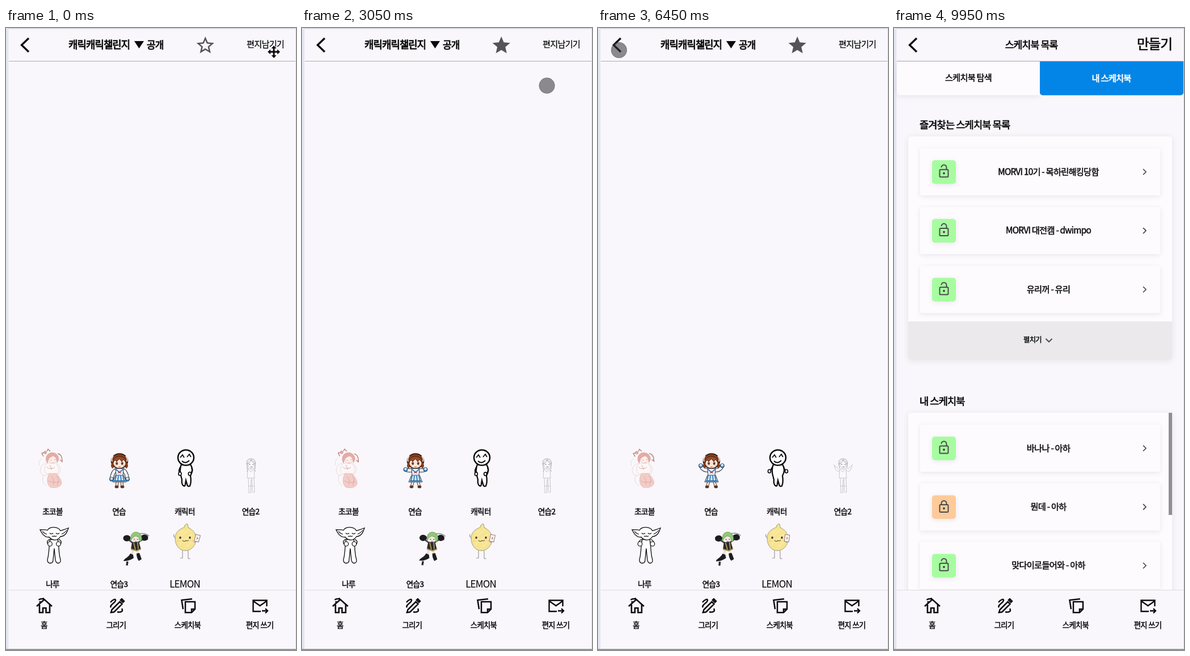
Write an HTML page with a canvas that moves like this. It is 511 by 1096 pixels and loops after 10 s.

```html
<!DOCTYPE html>
<html lang="ko">
<head>
<meta charset="utf-8">
<style>
html, body { margin: 0; width: 100%; height: 100%; overflow: hidden; background: #f9f7fb; }
canvas { display: block; width: 511px; height: 1096px; }
</style>
</head>
<body>
<canvas id="stage" width="511" height="1096"></canvas>
<script>
const ctx = document.getElementById('stage').getContext('2d');
const LOOP = 10000;
const BG = '#f9f7fb', CARD = '#fdfbfe', INK = '#0b0b0d', GREY = '#545456';
const FONT = '"Noto Sans CJK KR", "Noto Sans CJK JP", "Noto Sans CJK", "Noto Sans", sans-serif';

// Smooth value between keys [time, ...values].
function track(keys, t) {
  const i = keys.findIndex(k => k[0] > t);
  if (i < 0) return keys[keys.length - 1].slice(1);
  const a = keys[i - 1], b = keys[i];
  let p = (t - a[0]) / (b[0] - a[0]);
  p = p * p * (3 - 2 * p);
  return a.slice(1).map((v, n) => v + (b[n + 1] - v) * p);
}
const mix = (a, b, p) => a.map((v, i) => v + (b[i] - v) * p);

const POINTER = [
  [0, 472, 42], [200, 472, 42], [1150, 352, 34], [1500, 352, 36], [2050, 427, 64], [2600, 440, 110],
  [3200, 430, 100], [3850, 42, 33], [4000, 52, 37], [4120, 50, 38], [4850, 342, 605], [5350, 300, 572],
  [5700, 300, 572], [6300, 38, 38], [6450, 37, 39], [6900, 351, 26], [7150, 351, 26], [7750, 38, 33],
  [8050, 38, 33], [8450, 365, 305], [9200, 345, 420], [9700, 345, 430]
];
const RAISE = [[0, 0], [700, 1], [1400, .1], [2050, 1], [2700, 0], [3400, 1], [4000, 1], [5700, .2], [6450, .7], [7100, 0], [7700, 1], [10000, 0]];
const FOLD = [[0, 0], [2050, 0], [3300, 0], [4000, 1], [4500, 0], [10000, 0]];
const SPREAD = [[0, .5], [500, 1], [1200, 0], [1650, .7], [2050, 0], [2700, 1], [3300, .1], [3650, .6], [4000, 0], [5700, 0], [6450, 1], [7100, 0], [7700, 1], [10000, .5]];
const SHOW = [[0, 337], [600, 330], [1300, 339], [1700, 331], [2050, 339], [2700, 329], [3300, 339], [4000, 329], [5700, 339], [6450, 333], [7100, 339], [7700, 330], [10000, 337]];

function path(d, stroke, width = 1, fill) {
  const p = new Path2D(d);
  if (fill) { ctx.fillStyle = fill; ctx.fill(p); }
  if (stroke) { ctx.strokeStyle = stroke; ctx.lineWidth = width; ctx.stroke(p); }
}
function oval(x, y, rx, ry, fill, stroke, width = 1) {
  ctx.beginPath();
  ctx.ellipse(x, y, rx, ry, 0, 0, 7);
  if (fill) { ctx.fillStyle = fill; ctx.fill(); }
  if (stroke) { ctx.strokeStyle = stroke; ctx.lineWidth = width; ctx.stroke(); }
}
function box(x, y, w, h, fill, r = 0, shadow = 0) {
  ctx.save();
  if (shadow) { ctx.shadowColor = 'rgba(60,50,80,.1)'; ctx.shadowBlur = shadow; ctx.shadowOffsetY = 2; }
  ctx.fillStyle = fill;
  ctx.beginPath();
  ctx.roundRect(x, y, w, h, r);
  ctx.fill();
  ctx.restore();
}
// The thin outline gives regular text a medium weight.
function text(s, x, y, size, align = 'center', outline = .5, color = INK) {
  ctx.font = `400 ${size}px ${FONT}`;
  ctx.letterSpacing = -size * .05 + 'px';
  ctx.textAlign = align;
  ctx.textBaseline = 'alphabetic';
  ctx.fillStyle = ctx.strokeStyle = color;
  ctx.lineWidth = outline;
  ctx.fillText(s, x, y + size * .36);
  ctx.strokeText(s, x, y + size * .36);
}
function at(x, y, draw, scale = 1, angle = 0) {
  ctx.save();
  ctx.translate(x, y);
  ctx.rotate(angle);
  ctx.scale(scale, scale);
  draw();
  ctx.restore();
}
function bothSides(x, draw) {
  for (const side of [-1, 1]) {
    ctx.save();
    ctx.translate(x, 0);
    ctx.scale(side, 1);
    draw(side);
    ctx.restore();
  }
}

function frame() {
  box(0, 0, 511, 1096, BG);
  box(0, 0, 4.5, 1096, '#e3e7f2');
  box(4, 0, 507, 1.5, '#cfd1d9');
  box(510, 0, 1, 1096, '#dfdfe7');
  box(5, 58, 505, 1, '#aca9ae');
  path('M40 18L27.500 30L40 42', INK, 3.4);
}

function navigation() {
  box(5, 990, 505, 104, BG);
  box(5, 990, 505, 1, '#dddbe0');
  box(0, 1094, 511, 2, '#98979d');
  path('M54 1019L67.500 1007L81 1019M59 1016V1030H65V1022H70.500V1030H77V1016M60 1013V1010M58 1008q1-2 4-2t5-1', INK, 2.6);
  path('M185 1030l1.500-5 14-14 4 4-14 14zM202 1008l2-2 4 4-2 2zM184 1012c4-5 10-7 9-3s-11 8-8 12M196 1029c7 1 11-1 8-6', INK, 2.5);
  path('M312 1024L309.500 1008L328 1006M316 1011H333V1024L327 1030H316ZM333 1024H327V1030', INK, 2.5);
  path('M459.500 1019V1008.500H435.500V1028H449M436 1010l11.500 8 11.500-8M451 1027H461M457 1023l4 4-4 4', INK, 2.4);
  [['홈', 67], ['그리기', 194], ['스케치북', 320], ['편지 쓰기', 447]].forEach(([s, x]) => text(s, x, 1052, 13.3));
}

function pinkGirl(sway) {
  at(80, 776, () => {
    path('M-9-9C-18-7-22 2-18 9C-14 14-8 13-6 9M9-9C17-4 18 6 11 11M-17-18Q-24-12-21-5M-14 12Q-19 24-8 31', '#e8d2cf', .8);
    path('M-7-9C-13-3-14 6-8 10L10 10C14 4 13-5 8-9Z', '#e8cfcb', .7, '#fdf7f7');
    path('M-4 9C-8 17-9 27-2 33C8 36 18 32 18 25C17 18 12 13 9 9Z', '#e3b0aa', .7, '#f1cdc8');
    path('M0 14q6 5 3 15M9 13q6 6 1 17M-5 22q9 5 20 1', '#dda19a', .8);
    oval(2, -18, 8, 9, '#fdeeea', '#e0b0aa', .6);
    path('M-9-13C-13-31 12-33 13-16L10-10C10-17 7-21 3-22C-2-20-6-18-7-9Z', '#d59790', .6, '#e6aba5');
    path('M11-26q8 1 8 14l-4-3M-9-28l-8 1 3 6M-8-30l2-4 4 4', '#ba837a', 1.4);
    oval(-11, -28, 2.5, 2.5, '#e6aba5', '#c9867f', .7);
    path('M-2-15l3 1M5-15l3-1M2-10h2M-8-2q7 5 14 0M-3-6l4 8', '#d59790', .8);
  }, 1, sway);
}

function sailorGirl(raise, fold) {
  const hand = mix(mix([14, 795], [21, 761], raise), [14, 764], fold);
  const elbow = mix(mix([12, 781], [16, 780], raise), [24, 773], fold);
  const foot = 4.5 + 4 * raise;
  bothSides(200, () => {
    path(`M4 797L${foot} 807`, '#4b3028', 5);
    path(`M4 797L${foot} 807`, '#fbe0d0', 3.2);
    oval(foot + .5, 808.500, 3.4, 2.4, '#57352a');
    const arm = `M6 779Q${elbow} ${hand}`;
    path(arm, '#2b3646', 7);
    path(arm, '#f4f7fc', 5);
    oval(...hand, 3.6, 3.6, '#2f86c7', '#26394d', .8);
    oval(hand[0], hand[1] - 1, 2.2, 2.2, '#fbe0d0');
  });
  path('M193 776H207L206 789H194Z', '#26394d', 1, '#f4f7fc');
  path('M193 788H207L212 800H188Z', '#26394d', 1, '#dfe9f4');
  path('M190 798H210M194 789l-2 9M198 789l-1 9M202 789l1 9M206 789l2 9M193 777l7 6 7-6', '#2f78b4', 1.8);
  path('M200 781l-4 4 4-1 4 1Z', null, 0, '#b5443c');
  oval(200, 763, 14.500, 13, '#84401f', '#2a130b', 1.4);
  oval(200, 767, 10.500, 8.500, '#fde5d6');
  path('M188 766C188 751 212 751 212 766L207 760L204 764L200 759L195 764L192 761Z', '#3e1a0e', .9, '#9b4a2a');
  bothSides(200, () => {
    path('M11 754q4 5 2 10', '#f4eee9', 1.8);
    path('M12 768q3 4-1 7', '#84401f', 3.5);
    oval(4.7, 767, 2, 2.7, '#5a241c');
    oval(7.500, 771, 1.7, 1, '#f2b3a5');
    oval(4.2, 766, .7, .8, '#fff');
  });
  path('M198 773q2 1.500 4 0', '#a13c31', 1);
}

function doodle(spread) {
  path('M309 769C305 778 307 786 309 792L310 796Q309 803 312 806Q316 809 316 803L317 797L319 804Q320 809 324 807Q327 800 325 789C329 782 329 775 325 769Z', INK, 2.3, '#fff');
  oval(317, 757, 14, 13.500, '#fff', INK, 2.5);
  path('M307 757l4-5 3 5M319 756l4-5 3 5M310 763q6 6 13-1', INK, 1.8);
  bothSides(317, side => {
    const [x, y] = mix([side < 0 ? 9 : 4, 787], [15, 781], spread * spread);
    path(`M10 774Q14 782 ${x} ${y}`, INK, 2.2);
    oval(x, y, 2.5, 3, '#fff', INK, 1.7);
  });
}

function pencilGirl(spread) {
  const line = '#b3b1b5';
  path('M426 777L425 793H438L437 777ZM427 793l1 23q-3 3 1 3h2l1-24M433 793l1 23q-1 3 4 2l-1-25M428 779l3 3 4-3M427 807h5M433 807h5', line, .7);
  oval(432, 768, 6, 7, '#fcfbfd', line, .7);
  path('M426 776C422 764 425 759 432 759S441 765 438 776M425 768q5-1 7-7 2 5 7 7', '#9a989c', .9);
  path('M428 769h3M434 769h3M431 773h3', '#858387', 1);
  bothSides(432, () => {
    const [x, y] = mix([2, 777], [16, 771], spread * spread);
    path(`M6 779Q${8 + spread * 3} 786 ${x} ${y}M8 777L${x + 1} ${y - 2}`, line, .7);
  });
}

function elf(spread) {
  path('M78 901C75 912 77 922 73 937Q73 943 78 943Q83 943 83 937L85 917L87 937Q88 943 92 943Q97 942 96 937C92 924 94 912 91 901Z', INK, 1.3, '#fff');
  path('M73 885C67 883 63 885 60 884C64 893 70 898 76 897C82 904 91 904 96 896C104 896 108 888 110 881C104 884 100 884 96 886C92 878 77 878 73 885Z', INK, 1.3, '#fff');
  path('M64 887q4 4 8 5M107 885q-4 5-9 7M77 890q3 3 6 0M88 890q3 3 6 0M81 895q2 2 4 0q2 2 4 0', INK, 1.1);
  bothSides(85, () => {
    const x = 4 + spread * 7;
    path(`M8 901Q16 905 ${x + 2} 911`, INK, 1.2);
    oval(x, 909, 3.8, 4, '#fff', INK, 1.2);
  });
}

function greenGirl(sway) {
  at(228, 915, () => {
    path('M4-23q12-4 20 3M9-20q10 0 13 7', '#77797a', 1.3);
    path('M-4 4L-7 15M4 4L4 13', '#f0ddd2', 3.6);
    path('M-9 11C-12 18-19 19-21 24Q-12 25-3 19L-4 13ZM2 11Q2 19 6 24L11 21Q9 15 7 10Z', null, 0, '#1d1d20');
    path('M-14 25l-1 7', '#2b2b2e', 3.4);
    path('M-6-9L6-10L10 4L2 7L-8 4Z', null, 0, '#2b2b2e');
    path('M-8 3l10 3 8-3M-3-8l3 12M4-9l1 12', '#c9b05a', 1.5);
    oval(-15, -16, 6.500, 5.500, '#1c1c1f');
    oval(16, -17, 6.500, 5.500, '#1c1c1f');
    path('M-12-13L-5-8M6-9l7-5', '#36363a', 2.5);
    oval(0, -15, 6, 6, '#f7e6dc');
    path('M-8-16C-9-29 8-31 11-18Q12-12 8-9L6-18L0-20L-6-16L-8-10Z', '#5b864d', .7, '#8fca76');
    path('M-3-14h2M3-14h2M-1-10h3', '#3d4b39', 1.2);
  }, 1, sway);
}

function lemon(card) {
  path('M311 920L311 934h-4M321 920L321 935h4M299 899q-5-3-3-7', '#9c9a99', 1.2);
  path('M314 880q1-7 6-6l1 6C329 884 335 890 335 900C335 913 325 921 316 921C306 921 298 912 298 899C298 889 305 883 314 880Z', '#a39d7c', 1, '#f7e492');
  path('M305 890l10-6M304 898l17-13M306 910l22-19M318 914l11-10', '#faeaa6', 2);
  oval(307, 898, 1.7, 1.9, '#343333');
  oval(324, 898, 1.7, 1.9, '#343333');
  oval(303, 904, 2.4, 1.3, '#f5cf88');
  oval(329, 904, 2.4, 1.3, '#f5cf88');
  path('M311 903q3 3 6 0q3 2 5-1', '#6c5c46', 1.1);
  path(`M331 906Q334 908 ${card} 902`, '#9c9a99', 1.2);
  at(card, 899, () => {
    path('M-4-6H4V6H-4Z', '#827e85', 1, '#fff7f5');
    path('M-1-2l2 2-2 2', '#d06461', 1.2);
  }, 1, (card - 330) * .04);
}

const STAR = 'M12 17.270L18.180 21l-1.640-7.030L22 9.240l-7.190-.61L12 2 9.190 8.630 2 9.240l5.460 4.730L5.820 21z';
const STAR_HOLE = 'M12 15.400l-3.760 2.270 1-4.280-3.320-2.880 4.380-.38L12 6.100l1.710 4.040 4.380.38-3.320 2.880 1 4.280z';

function roomPage(t, starred) {
  text('캐릭캐릭챌린지', 110, 30, 17.8, 'left', .9);
  path('M226 23H243L234.500 36Z', null, 0, INK);
  text('공개', 248, 30, 17, 'left', .9);
  text('편지남기기', 424, 29, 15.2, 'left', .25);
  at(332.500, 11.800, () => {
    path(STAR, null, 0, GREY);
    if (!starred) path(STAR_HOLE, null, 0, BG);
  }, 1.56);

  const [raise] = track(RAISE, t), [fold] = track(FOLD, t), [spread] = track(SPREAD, t);
  const sway = Math.sin(t / 380) * .03;
  pinkGirl(sway);
  sailorGirl(raise, fold);
  doodle(spread);
  pencilGirl(spread);
  elf(spread);
  greenGirl(sway);
  lemon(track(SHOW, t)[0]);
  [['초코볼', 82], ['연습', 199], ['캐릭터', 315], ['연습2', 431]].forEach(([s, x]) => text(s, x, 852, 13.6));
  text('나루', 82, 980, 13.6);
  text('연습3', 199, 980, 13.6);
  text('LEMON', 315, 980, 17, 'center', .1);
}

function row(y, label, locked) {
  box(46, y, 423, 83, CARD, 3, 8);
  box(67, y + 21, 42, 41.500, locked ? '#fdcb99' : '#a7fca0', 5, 8);
  at(88, y + 41.500, () => {
    ctx.beginPath();
    ctx.roundRect(-7.500, -4, 15, 13, 1.5);
    ctx.strokeStyle = '#4a4a4c';
    ctx.lineWidth = 2;
    ctx.stroke();
    path(locked ? 'M-4.500-4V-6.500a4.500 4.500 0 0 1 9 0V-4' : 'M-4.500-7.800a4.500 4.500 0 0 1 9 0V-4', '#4a4a4c', 2);
    oval(0, 2.500, 2, 2, '#4a4a4c');
  });
  text(label, 272, y + 41, 15.3);
  path(`M439 ${y + 36.500}l5 5-5 5`, '#3f3f42', 1.6);
}

const FAVOURITES = ['MORVI 10기 - 목하린해킹당함', 'MORVI 대전캠 - dwimpo', '유리꺼 - 유리', '캐릭캐릭챌린지 - 왕자'];
const MINE = ['바나나 - 아하', '뭔데 - 아하', '맞다이로들어와 - 아하'];

function listPage(starred, age) {
  text('스케치북 목록', 242, 30, 17.2, 'center', .7);
  text('만들기', 428, 28, 23.7, 'left', .7);
  const tab = ctx.createLinearGradient(5, 0, 257, 0);
  const dim = Math.max(0, 1 - age / 600) * 14;
  tab.addColorStop(0, CARD);
  tab.addColorStop(1, `rgb(${253 - dim},${251 - dim},${254 - dim})`);
  box(5, 59, 252, 59.500, tab, [0, 0, 0, 5], 8);
  box(257, 59, 253, 59.500, '#0385e7', [0, 0, 5, 5]);
  text('스케치북 탐색', 131, 88, 15.2);
  text('내 스케치북', 383, 88, 15.3, 'center', .7, '#fff');

  const count = starred ? 4 : 3;
  const bar = starred ? 600 : 517;
  text('즐겨찾는 스케치북 목록', 45, 171, 17.6, 'left', .7);
  box(25, 191, 465, bar - 124, CARD, 5, 12);
  for (let i = 0; i < count; i++) row(212 + i * 103.6, FAVOURITES[i]);
  if (starred) box(484, 191, 6, 394, '#8f8e90');
  box(25, bar, 465, 67.500, '#ebe9ec', [0, 0, 5, 5]);
  text('펼치기', 244, bar + 33, 12.3);
  path(`M267.500 ${bar + 30.500}l5.500 5.500 5.500-5.500`, GREY, 2.2);

  text('내 스케치북', 45, bar + 141, 17.6, 'left', .7);
  box(25, bar + 161, 465, 400, CARD, 5, 12);
  MINE.forEach((s, i) => row(bar + 182 + i * 103.4, s, i === 1));
  box(484, bar + 161, 6, 180, '#8f8e90');
}

function pointer(t) {
  if (t > 9700) return;
  const [x, y] = track(POINTER, t);
  if (t < 150) {
    at(x, y, () => {
      const arrows = 'M0-11L4.500-6H1.500V-1.500H6V-4.500L11 0L6 4.500V1.500H1.500V6H4.500L0 11L-4.500 6H-1.500V1.500H-6V4.500L-11 0L-6-4.500V-1.500H-1.500V-6H-4.500Z';
      path(arrows, '#fff', 2);
      path(arrows, null, 0, INK);
    });
  } else {
    oval(x, y, 14, 14, 'rgba(50,48,52,.55)');
    oval(x, y, 13.5, 13.5, null, 'rgba(90,88,92,.3)');
  }
}

function draw() {
  const t = performance.now() % LOOP;
  const starred = t >= 1300 && t < 7050;
  const firstList = t >= 4120 && t < 5700, lastList = t >= 8080;
  frame();
  if (firstList || lastList) listPage(starred, t - (lastList ? 8080 : 4120));
  else roomPage(t, starred);
  if ((t >= 3950 && t < 4120) || (t >= 7900 && t < 8080)) box(25, 14, 32, 32, 'rgba(51,181,229,.4)');
  navigation();
  pointer(t);
  requestAnimationFrame(draw);
}
draw();
</script>
</body>
</html>
```
